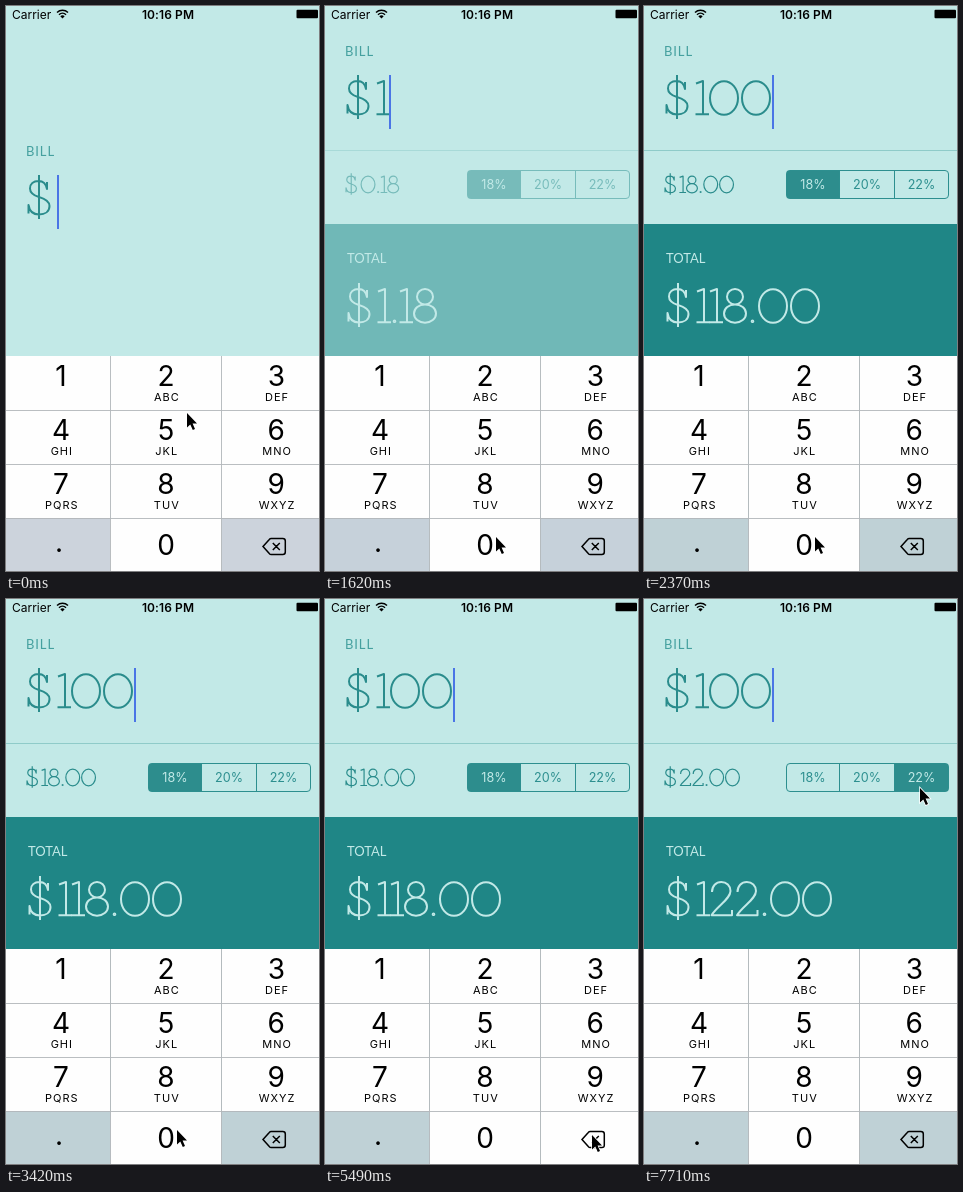
An HTML page that plays this animation: 313x565 px, repeating every 8000 ms.

```html
<!DOCTYPE html>
<html lang="en">
<head>
<meta charset="utf-8">
<title>Tip calculator</title>
<style>
html, body { margin: 0; width: 100%; height: 100%; overflow: hidden; background: #c2e9e7; }
svg { display: block; width: 313px; height: 565px; }
text { font-family: Inter, sans-serif; }
.label { font: 400 13px Lato, sans-serif; }
.digit { font-size: 28px; text-anchor: middle; }
.letters { font-size: 11px; letter-spacing: 1px; text-anchor: middle; }
.percent { font-size: 12.6px; text-anchor: middle; }
.status { font-size: 12px; }
.time { font-weight: 600; letter-spacing: .1px; text-anchor: middle; }
.figures { fill: none; stroke: #2a8c8c; stroke-width: 2; stroke-linejoin: round; }
.thin { stroke-width: 2.4; }
.light { stroke: #c2e9e7; }
</style>
</head>
<body>
<svg viewBox="0 0 313 565">
  <rect width="313" height="565" fill="#c2e9e7"/>
  <g id="screen">
    <text class="label" x="20" y="50" letter-spacing=".9" fill="#45a09f">BILL</text>
    <g id="bill" class="figures" role="img" transform="translate(21 74)"></g>
    <rect id="caret" y="69" width="2" height="54" fill="#4a75e6"/>
    <g id="details">
      <path d="M0 144.5H313" stroke="#8fcbc9"/>
      <g id="tip" class="figures thin" role="img" transform="translate(20.3 169.6) scale(.494)"></g>
      <g id="segments"></g>
      <rect y="218" width="313" height="347" fill="#1f8686"/>
      <text class="label" x="22" y="257" fill="#c2e9e7">TOTAL</text>
      <g id="total" class="figures light" role="img" transform="translate(22 282)"></g>
    </g>
  </g>
  <g id="keypad"></g>
  <g id="statusBar">
    <text class="status" x="6" y="12.5">Carrier</text>
    <path d="M51 6.5a8 8 0 0 1 11 0M53 8.7a5 5 0 0 1 7 0" fill="none" stroke="#000" stroke-width="1.5"/>
    <path d="M54.3 10.3a3.2 3.2 0 0 1 4.4 0L56.5 12.6Z"/>
    <text class="status time" x="162" y="12.5">10:16 PM</text>
    <rect x="290.5" y="3.8" width="21.5" height="8.4" rx="1"/>
  </g>
  <path id="pointer" d="M0 0V14.5L3.3 11.4L5.8 17L8 16L5.6 10.6H10Z" stroke="#fff" stroke-width="1.5" paint-order="stroke"/>
</svg>
<script>
const LOOP = 8000;
const el = id => document.getElementById(id);
const ring = (x, y, rx, ry) => `M${x - rx} ${y}a${rx} ${ry} 0 1 1 ${2 * rx} 0a${rx} ${ry} 0 1 1 ${-2 * rx} 0`;

// Thin slab figures: advance width and centre line
const GLYPHS = {
  '$': [30, 'M12-5V39M20 2V9C19 3.5 16 1 11.5 1C6.5 1 3 4 3 8.5C3 13.5 7 15.5 12 17C18 18.8 22.5 21 22.5 26C22.5 31.5 18 34.5 12 34.5C6.5 34.5 2.5 31.5 1.5 25V33.5'],
  '0': [32, ring(16, 18, 14, 16.8)],
  '1': [13, 'M1 3.5L8 1V34.2M.5 34.2H14'],
  '2': [25.5, 'M3 11C3 5 7 1 12.3 1C17.5 1 21.5 4.8 21.5 10C21.5 18 8 25 2.5 34.2H23V29'],
  '8': [26, ring(13, 8.7, 8, 7.7) + ring(13, 25.6, 11, 9.2)],
  '.': [9, ring(4.5, 33.2, .8, .8)]
};
const widthOf = text => [...text].reduce((sum, c) => sum + GLYPHS[c][0], 0);

function setFigures(id, text) {
  const node = el(id);
  if (node.getAttribute('aria-label') === text) return;
  node.setAttribute('aria-label', text);
  node.innerHTML = [...text].map((c, i) =>
    `<path d="${GLYPHS[c][1]}" transform="translate(${widthOf(text.slice(0, i))})"/>`).join('');
}

// Keypad
const EDGES = [0, 104.5, 215.5, 313], CENTRES = [55, 160, 270.3];
const KEYS = ['1', '2 ABC', '3 DEF', '4 GHI', '5 JKL', '6 MNO', '7 PQRS', '8 TUV', '9 WXYZ', '.', '0', 'back'];
const BACK_ICON = '<path d="M257 540.5L263.3 533.4Q264 532.5 265.3 532.5H276.8Q279.3 532.5 279.3 535V546Q279.3 548.5 276.8 548.5H265.3Q264 548.5 263.3 547.6ZM266.8 537l7 7m0-7l-7 7" fill="none" stroke="#000" stroke-width="1.5"/>';
el('keypad').innerHTML = KEYS.map((key, i) => {
  const [name, letters = ''] = key.split(' ');
  const col = i % 3, y = 350 + 54 * Math.floor(i / 3), cx = CENTRES[col];
  const box = `x="${EDGES[col]}" y="${y}" width="${EDGES[col + 1] - EDGES[col]}" height="55"`;
  const face = name === 'back' ? BACK_ICON
    : name === '.' ? '<text class="digit" x="53" y="546">.</text>'
    : `<text class="digit" x="${cx}" y="${y + (i > 8 ? 37 : 30)}">${name}</text>`;
  return `<rect ${box} fill="#fefefe"/>
    <g class="shade" data-key="${name}">
      <rect ${box} fill="#ccd3dc"/><rect ${box} fill="#75bfb4"/></g>
    ${face}<text class="letters" x="${cx + .8}" y="${y + 45}">${letters}</text>`;
}).join('') + '<path d="M104.5 350V565M215.5 350V565M0 404.5H313M0 458.5H313M0 512.5H313" stroke="#b3b7ba" stroke-width=".9"/>';

// Percentage selector
const STOPS = [142.5, 195.5, 250.5, 304.5];
el('segments').innerHTML = '<clipPath id="round"><rect x="142" y="164" width="163" height="29" rx="4"/></clipPath>' +
  [18, 20, 22].map((pct, i) => `<g data-pct="${pct}">
    <rect x="${STOPS[i]}" y="164.5" width="${STOPS[i + 1] - STOPS[i]}" height="28" fill="#2d8d8d" clip-path="url(#round)"/>
    <text class="percent" x="${(STOPS[i] + STOPS[i + 1]) / 2}" y="183">${pct}%</text></g>`).join('') +
  '<path d="M195.5 164.5v28M250.5 164.5v28" stroke="#2d8f8f"/><rect x="142.5" y="164.5" width="162" height="28" rx="3.5" fill="none" stroke="#2d8f8f"/>';

// What is tapped when, and the pointer's journeys: start, end, destination
const TAPS = [[880, '1'], [1770, '0'], [2070, '0'], [3710, '0'], [5470, 'back'], [6670, 20], [7560, 22]];
const MOVES = [[150, 590, 80, 385], [960, 1390, 171, 531], [4010, 4750, 218, 178],
  [5050, 5450, 267, 536], [5850, 6380, 225, 172], [6820, 7260, 276, 189]];
const HOLD = 200, BLINK = 890;

const ease = (t, from, to) => {
  const u = Math.min(1, Math.max(0, (t - from) / (to - from)));
  return (1 - Math.cos(Math.PI * u)) / 2;
};

function replay(t) {
  const state = { bill: '', percent: 18, typed: -600, pressed: '' };
  for (const [time, target] of TAPS.filter(tap => tap[0] <= t)) {
    if (typeof target === 'number') { state.percent = target; continue; }
    state.bill = target === 'back' ? state.bill.slice(0, -1) : state.bill + target;
    state.typed = time;
    state.pressed = t < time + HOLD ? target : '';
  }
  return state;
}

// Solid after typing, then blinking with half-tone steps
function caretOpacity(elapsed) {
  const phase = (elapsed - 750) % BLINK;
  if (phase < 0 || phase >= 600) return 1;
  return phase >= 150 && phase < 450 ? 0 : .5;
}

function pointerAt(t) {
  let x = 181, y = 407;
  for (const [from, to, toX, toY] of MOVES) {
    const k = ease(t, from, to);
    x += (toX - x) * k;
    y += (toY - y) * k;
  }
  return [x, y];
}

function draw(t) {
  const { bill, percent, typed, pressed } = replay(t);
  const tip = bill * percent / 100;
  const reveal = ease(t, 1170, 2070);

  setFigures('bill', '$' + bill);
  setFigures('tip', '$' + tip.toFixed(2));
  setFigures('total', '$' + (+bill + tip).toFixed(2));
  el('caret').setAttribute('x', 21 + widthOf('$' + bill));
  el('caret').setAttribute('opacity', caretOpacity(t - typed));
  el('screen').setAttribute('transform', `translate(0 ${100 * (1 - ease(t, 880, 1380))})`);
  el('details').setAttribute('opacity', reveal);
  el('pointer').setAttribute('transform', `translate(${pointerAt(t)})`);

  for (const seg of el('segments').querySelectorAll('[data-pct]')) {
    const chosen = +seg.dataset.pct === percent;
    seg.children[0].setAttribute('opacity', chosen ? 1 : 0);
    seg.children[1].setAttribute('fill', chosen ? '#c2e9e7' : '#2d8f8f');
  }
  for (const shade of document.querySelectorAll('.shade')) {
    const key = shade.dataset.key;
    const greyAtRest = key === '.' || key === 'back';
    shade.setAttribute('opacity', greyAtRest !== (key === pressed) ? 1 : 0);
    shade.lastElementChild.setAttribute('opacity', .15 * reveal);
  }
}

const start = performance.now();
function frame() {
  draw((performance.now() - start) % LOOP);
  requestAnimationFrame(frame);
}
frame();
</script>
</body>
</html>
```
